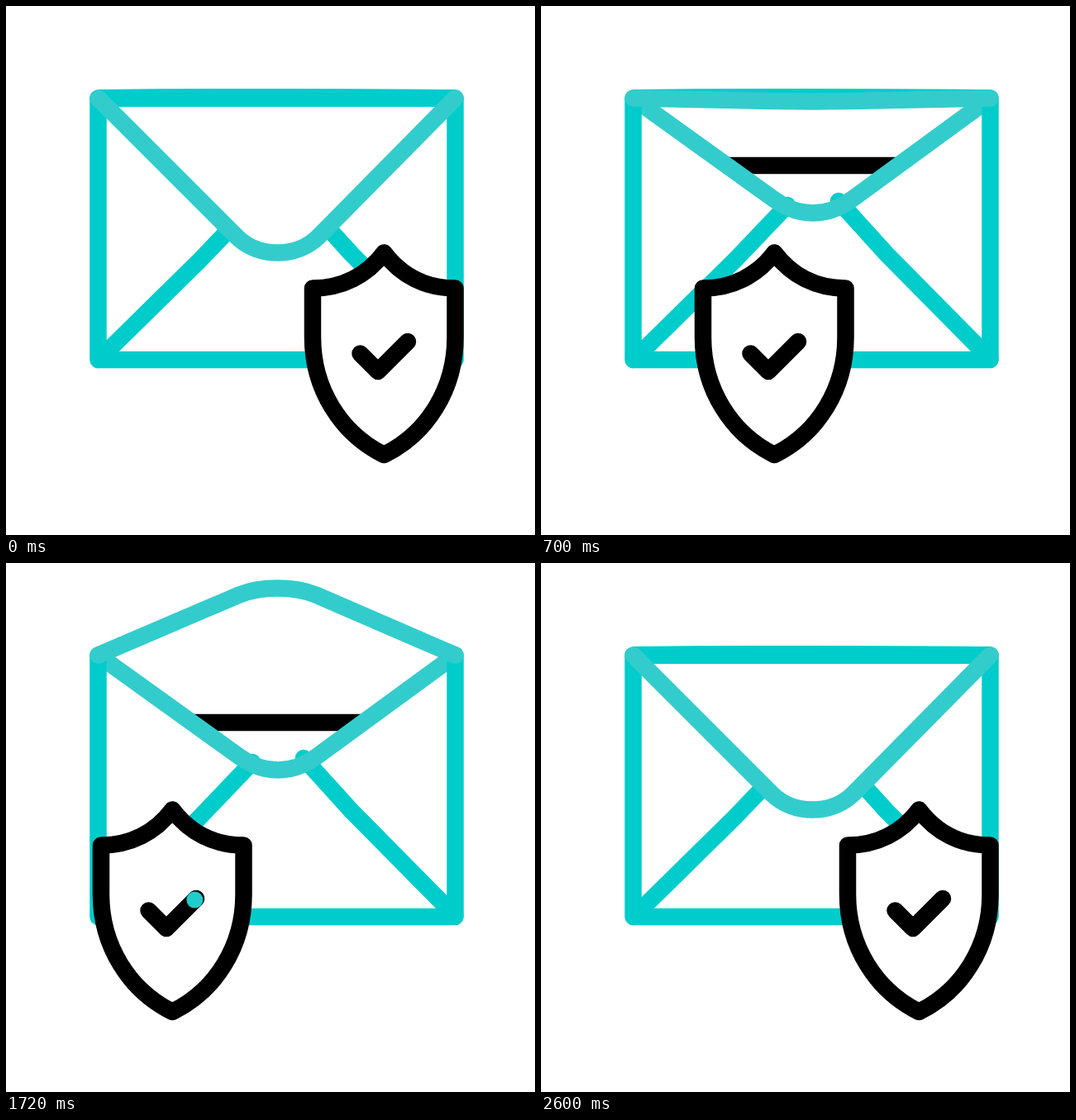
These frames come from a looping animation (640 px wide and 640 px high, 2.82 s). An HTML page:

```html
<!DOCTYPE html>
<html lang="en">
<head>
<meta charset="utf-8">
<title>Protected mail</title>
<style>
  html, body { margin: 0; width: 100%; height: 100%; overflow: hidden; background: #fff; }
  svg { display: block; width: 100vw; height: 100vh; }
  .line { fill: none; stroke: #0cc; stroke-width: 20.5; stroke-linecap: round; stroke-linejoin: round; }
  .light { stroke: #3cc; }
  .ray { stroke: #4cd5d5; }
  .ink { stroke: #000; }
</style>
</head>
<body>
<svg viewBox="0 0 640 640">
  <rect width="640" height="640" fill="#fff"/>
  <g id="rays"></g>

  <path class="line ink" d="M225 193H431" style="stroke-linecap:butt"/>
  <path class="line" d="M112 428L235 307L298 241M360 236L418 300L543.5 427"/>
  <path class="line light" d="M111.5 111.5L282 234C312 256 346 256 376 234L543.5 111.5"/>
  <path id="flapFill" fill="#fff"/>
  <path class="line" d="M111.5 112V428H543.5V112"/>
  <path id="bar" fill="#0cc" d="M111.5 101Q327 99 543.5 101V122H111.5Z"/>
  <path id="flap" class="line light"/>

  <g id="shield">
    <path class="line ink" style="fill:#fff"
      d="M457.3 298.5C437 326 406 341.5 371 341.5V401C371 463 405 517 457.3 543C510 517 543.5 463 543.5 401V341.5C508 341.5 478 326 457.3 298.5Z"/>
    <path id="check" class="line ink" d="M428.5 420.5L450 442L486 406"/>
    <circle id="dot" r="10"/>
  </g>
</svg>
<script>
const LOOP = 2820, STEP = 20;
const $ = id => document.getElementById(id);
const mix = (a, b, k) => a + (b - a) * k;

// Smooth progress from time a to time b
function ease(t, a, b) {
  const u = Math.min(1, Math.max(0, (t - a) / (b - a)));
  return u * u * (3 - 2 * u);
}

// Inner and outer end of each ray
const rays = [
  [129.5, 44.5, 112.5, 15.3],
  [74, 94, 45, 76],
  [60, 167.5, 26.5, 167.5]
].map(ends => {
  const el = document.createElementNS('http://www.w3.org/2000/svg', 'path');
  el.setAttribute('class', 'line ray');
  $('rays').append(el);
  return { el, ends };
});

function drawFlap(open) {
  const x = mix(279, 281, open), y = mix(279, 39, open);
  const cx = mix(305, 307.5, open), cy = mix(305, 27.7, open);
  const d = `M111.5 111.5L${x} ${y}C${cx} ${cy} ${657 - cx} ${cy} ${657 - x} ${y}L543.5 111.5`;
  $('flap').setAttribute('d', d);
  $('flapFill').setAttribute('d', d + 'Z');
  const tip = y * 0.25 + cy * 0.75;
  $('bar').style.display = tip > 111.5 ? '' : 'none';
}

function drawRays(t) {
  const head = ease(t, 900, 1300), tail = ease(t, 1300, 1700);
  for (const { el, ends: [x1, y1, x2, y2] } of rays) {
    const at = k => mix(x1, x2, k) + ' ' + mix(y1, y2, k);
    el.style.display = head > tail ? '' : 'none';
    el.setAttribute('d', `M${at(tail)}L${at(head)}`);
  }
}

function drawDot(t) {
  const dot = $('dot'), check = $('check'), k = ease(t, 1000, 1800);
  const p = check.getPointAtLength(k * check.getTotalLength());
  dot.style.display = k > 0 && k < 1 ? '' : 'none';
  dot.setAttribute('cx', p.x);
  dot.setAttribute('cy', p.y);
  dot.setAttribute('fill', `rgb(${Math.round(34 * k)},204,204)`);
}

function draw(t) {
  const shift = -256 * (ease(t, 200, 1000) - ease(t, 1800, 2600));
  $('shield').setAttribute('transform', `translate(${shift} 0)`);
  drawFlap(ease(t, 200, 1000) - ease(t, 1780, 2560));
  drawRays(t);
  drawDot(t);
}

const start = performance.now();
function tick() {
  const t = (performance.now() - start) % LOOP;
  draw(Math.floor(t / STEP) * STEP);
  requestAnimationFrame(tick);
}
tick();
</script>
</body>
</html>
```
